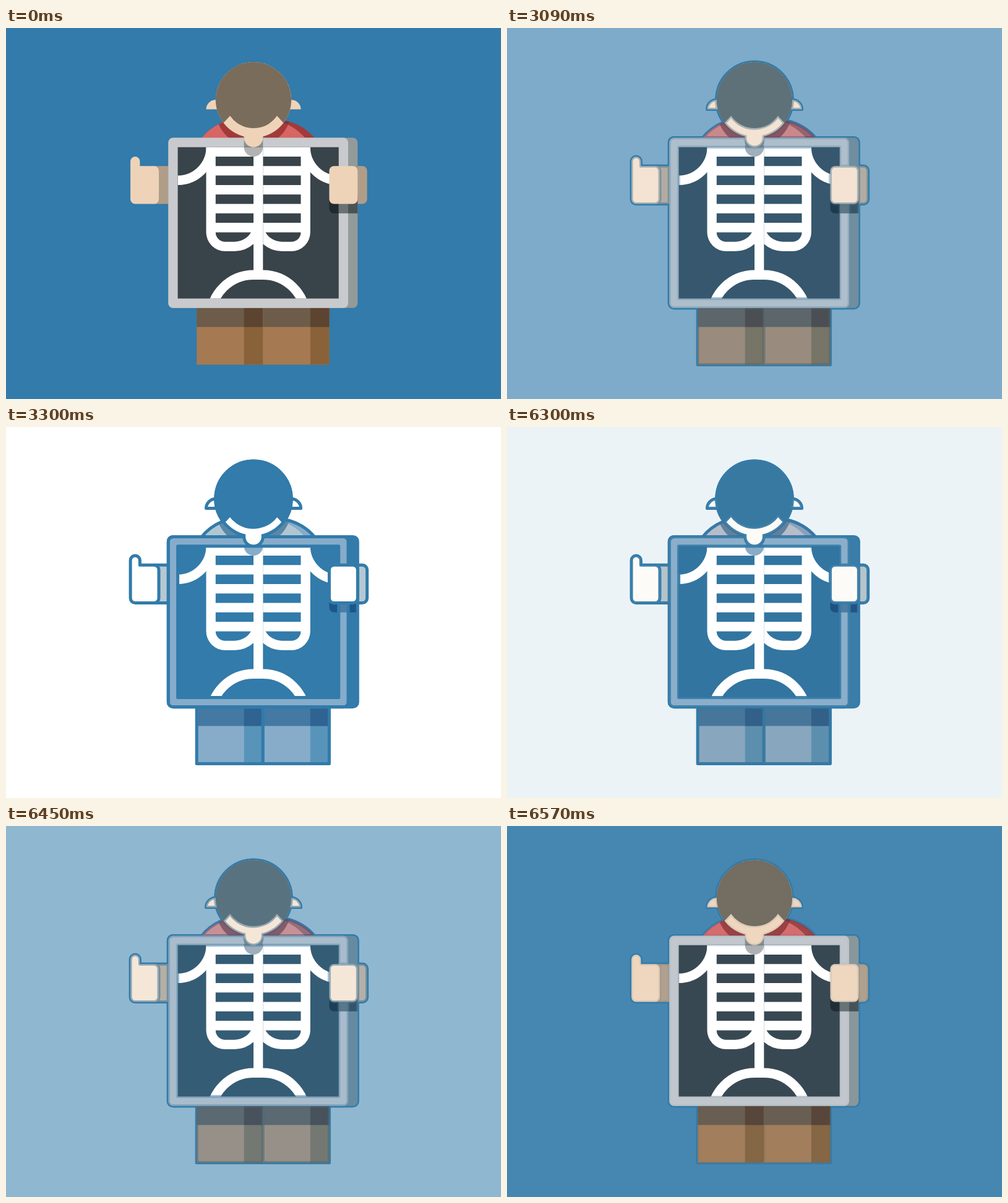
Write an HTML page with a canvas that moves like this. It is 800x600 px and loops after 6600 ms.

```html
<!DOCTYPE html>
<html lang="en">
<head>
<meta charset="utf-8">
<title>X-ray</title>
<style>
html, body { margin: 0; width: 100%; height: 100%; overflow: hidden; background: #327baa; }
canvas { display: block; width: 800px; height: 600px; }
</style>
</head>
<body>
<canvas id="stage" width="800" height="600"></canvas>
<script>
const PI = Math.PI;
const UNIT = 15.3;          // grid cell in pixels; the figure is laid out in cells
const LINE = 5 / UNIT;
const LOOP = 6600, HOLD = 3000, FADE = 300, STEP = 30;

const flat = {
  bg: '#327baa', skin: '#eed3b9', wrist: '#b09d88', hair: '#7a6c5b',
  shirt: '#d96464', shirtDark: '#a23a3a', headShade: '#a23a3a', headShadeDark: '#803238',
  leg: '#a57a52', legDark: '#8a6239', legTop: '#6d5c4a', legTopDark: '#5c4430',
  frame: '#c8cacd', side: '#939a9a', screen: '#39434a', bone: '#ffffff',
  chinShade: 'rgba(0,0,0,.3)', handShade: ['#202a2e', '#6a7272', '#4a5354'],
  line: null
};

const blue = {
  bg: '#ffffff', skin: '#ffffff', wrist: '#b5c8d2', hair: '#327baa',
  shirt: '#b0c7d3', shirtDark: '#86acca', headShade: '#5b87a6', headShadeDark: '#5b87a6',
  leg: '#86acca', legDark: '#5894ba', legTop: '#4479a3', legTopDark: '#2f6392',
  frame: '#86acca', side: '#327baa', screen: '#327baa', bone: '#ffffff',
  chinShade: '#86acca', handShade: ['#1d568a', '#4a7ea8', '#1d568a'],
  line: '#327baa'
};

function shape(build) {
  const p = new Path2D();
  build(p);
  return p;
}
const rect = (x, y, w, h) => shape(p => p.rect(x, y, w, h));
const round = (x, y, w, h, r = 0.5) => shape(p => p.roundRect(x, y, w, h, r));
const disc = (x, y, r) => shape(p => p.arc(x, y, r, 0, 2 * PI));

// Vertical tongue with a round lower end
const tongue = (top, end, r) => shape(p => {
  p.moveTo(-r, top);
  p.lineTo(r, top);
  p.arc(0, end, r, 0, PI);
  p.closePath();
});

const torso = shape(p => {
  p.moveTo(-5.49, 8.04);
  p.quadraticCurveTo(-4.7, 7, -3.27, 6.37);
  p.lineTo(3.4, 6.21);
  p.quadraticCurveTo(5.23, 6.6, 6.47, 8.04);
  p.lineTo(6.6, 8.4);
  p.lineTo(-5.7, 8.4);
  p.closePath();
});

const ear = shape(p => {
  p.moveTo(-3, 5);
  p.lineTo(-5, 5);
  p.arc(-4, 5, 1, PI, 1.5 * PI);
  p.lineTo(-3, 4);
  p.closePath();
});

const hair = shape(p => {
  p.arc(0, 4, 4, PI - 0.656, 2 * PI + 0.656);
  p.arc(0, 4, 3, 0.6, PI - 0.6);
  p.closePath();
});

const thumbHand = shape(p => {
  p.moveTo(-12, 11);
  p.arcTo(-10, 11, -10, 15, 0.5);
  p.arcTo(-10, 15, -13, 15, 0.5);
  p.arcTo(-13, 15, -13, 10, 0.5);
  p.arc(-12.5, 10.5, 0.5, PI, 2 * PI);
  p.closePath();
});

const ribs = shape(p => {
  p.moveTo(0, 9);
  p.lineTo(-5, 9);
  p.arc(-3, 18, 2, PI, PI / 2, true);
  p.arc(-2, 17, 3, PI / 2, Math.atan2(Math.sqrt(5), 2), true);
  p.closePath();
});

const ribGaps = shape(p => {
  for (let y = 10; y < 18; y += 2) p.rect(-4, y, 4, 1);
  p.moveTo(-4, 18);
  p.arc(-3, 18, 1, PI, PI / 2, true);
  p.arc(-2, 17, 2, PI / 2, PI / 6, true);
  p.closePath();
});

const clavicle = shape(p => p.arc(-8, 9, 3.5, 0, PI / 2));
const pelvis = shape(p => {
  p.arc(0, 27, 4.5, PI, 1.5 * PI);
  p.arc(1, 27, 4.5, 1.5 * PI, 2 * PI);
});

const side = round(-9, 8, 20, 18);
const front = round(-9, 8, 19, 18);
const screen = rect(-8, 9, 17, 16);

function makeScene(pal) {
  const canvas = document.createElement('canvas');
  canvas.width = 800;
  canvas.height = 600;
  const c = canvas.getContext('2d');
  const fill = (path, color) => { c.fillStyle = color; c.fill(path); };
  const outline = path => {
    if (!pal.line) return;
    c.strokeStyle = pal.line;
    c.lineWidth = LINE;
    c.stroke(path);
  };
  const paint = (path, color) => { fill(path, color); outline(path); };
  const scoped = draw => { c.save(); draw(); c.restore(); };
  // Draws once as is and once mirrored about x = axis
  const both = (axis, draw) => {
    draw();
    scoped(() => { c.translate(2 * axis, 0); c.scale(-1, 1); draw(); });
  };

  function drawTorso() {
    fill(torso, pal.shirtDark);
    scoped(() => {
      c.clip(torso);
      fill(disc(0, 5, 4), pal.headShadeDark);
      c.translate(-1, 0);
      c.clip(torso);
      fill(torso, pal.shirt);
      c.translate(1, 0);
      fill(disc(0, 5, 4), pal.headShade);
    });
    outline(torso);
  }

  function drawLeg(x) {
    fill(rect(x, 25, 7, 7), pal.leg);
    fill(rect(x + 5, 25, 2, 7), pal.legDark);
    fill(rect(x, 25, 7, 3), pal.legTop);
    fill(rect(x + 5, 25, 2, 3), pal.legTopDark);
    outline(rect(x, 25, 7, 7));
  }

  function drawBones() {
    c.clip(screen);
    c.strokeStyle = pal.bone;
    c.lineWidth = 1;
    both(0.5, () => {
      c.stroke(clavicle);
      fill(ribs, pal.bone);
      fill(ribGaps, pal.screen);
    });
    fill(rect(0, 9, 1, 13.5), pal.bone);
    c.stroke(pelvis);
  }

  function drawBoard() {
    fill(side, pal.side);
    fill(front, pal.frame);
    fill(screen, pal.screen);
    scoped(drawBones);
    fill(tongue(8, 9, 1), pal.chinShade);
    pal.handShade.forEach((color, i) =>
      fill(round(8 + i, 14, 1, 2, i ? 0 : [0, 0, 0, 0.5]), color));
    [side, front, screen].forEach(outline);
  }

  function drawHead() {
    both(0, () => paint(ear, pal.skin));
    const face = disc(0, 4, 4), nose = tongue(7, 8, 1);
    const inset = pal.line ? LINE / 2 : 0;
    outline(face);
    outline(nose);
    fill(disc(0, 4, 4 - inset), pal.skin);
    fill(tongue(6.5, 8, 1 - inset), pal.skin);
    paint(hair, pal.hair);
  }

  c.fillStyle = pal.bg;
  c.fillRect(0, 0, 800, 600);
  c.setTransform(UNIT, 0, 0, UNIT, 400, 55);
  c.lineJoin = 'round';

  drawTorso();
  drawLeg(-6);
  drawLeg(1);
  paint(round(-11, 11, 3, 4), pal.wrist);
  paint(round(9, 11, 3, 4), pal.wrist);
  drawBoard();
  drawHead();
  paint(thumbHand, pal.skin);
  paint(round(8, 11, 3, 4), pal.skin);
  return canvas;
}

// Share of the blue scene at time t
function mix(t) {
  const half = HOLD + FADE;
  const late = t >= half;
  const into = t % half - HOLD;
  const part = into < 0 ? 0 : (Math.floor(into / STEP) + 1) / (FADE / STEP + 1);
  return late ? 1 - part : part;
}

const ctx = document.getElementById('stage').getContext('2d');
const flatScene = makeScene(flat);
const blueScene = makeScene(blue);
const start = performance.now();

function render() {
  const t = (performance.now() - start) % LOOP;
  ctx.globalAlpha = 1;
  ctx.drawImage(flatScene, 0, 0);
  ctx.globalAlpha = t >= HOLD + FADE && t < LOOP - FADE ? 1 : blend(t);
  ctx.drawImage(blueScene, 0, 0);
  requestAnimationFrame(render);
}

// The last fade-in step is reached as the second hold begins
function blend(t) {
  return Math.min(1, Math.max(0, mix(t)));
}

render();
</script>
</body>
</html>
```
